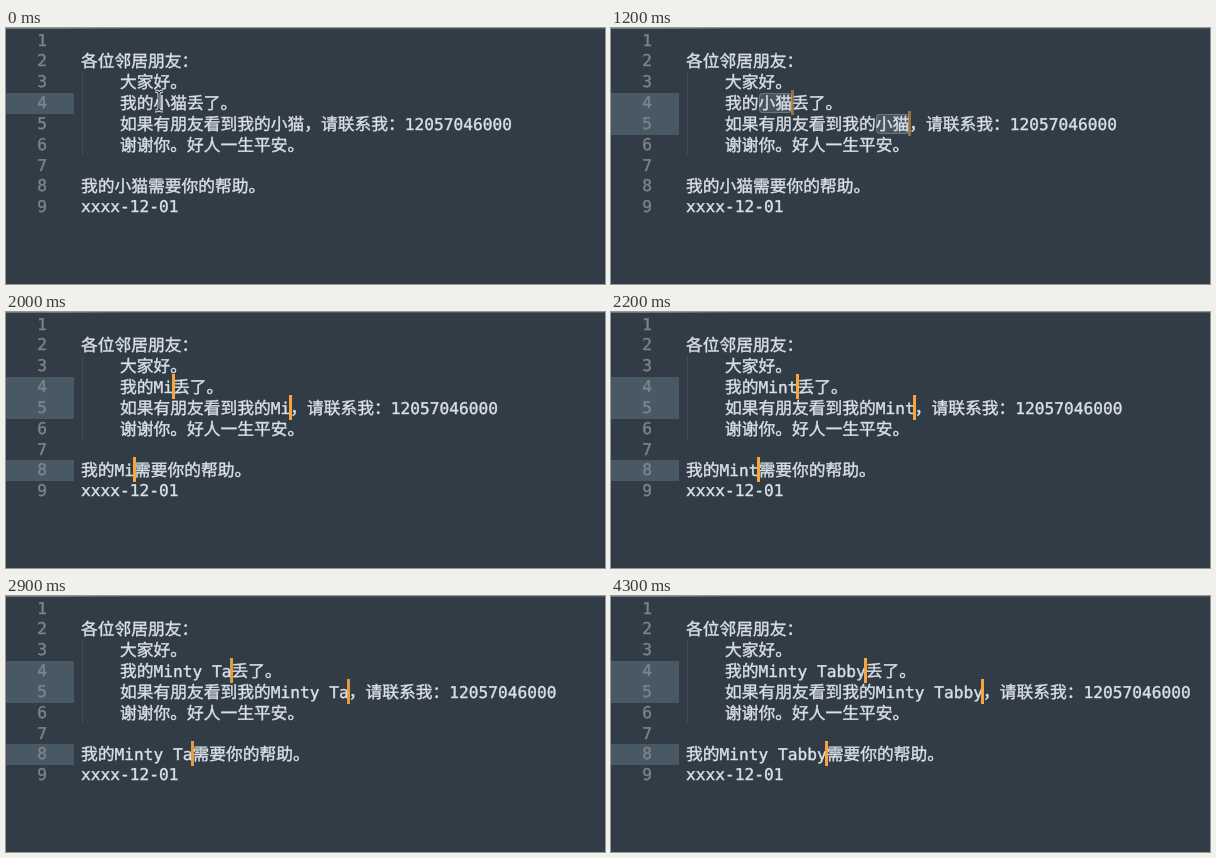
An HTML page for the animation above (4400 ms loop, 599x256 px).

```html
<!DOCTYPE html>
<html lang="zh-CN">
<meta charset="utf-8">
<style>
html, body { margin: 0; width: 100%; height: 100%; overflow: hidden; background: #313c46; }
#editor {
  position: absolute; inset: 0; padding-top: 2.5px; overflow: hidden;
  font: 16.2px/20.85px 'DejaVu Sans Mono', 'Noto Sans CJK SC', monospace;
  color: #dae0e8; white-space: pre; -webkit-text-stroke: 0.4px;
  text-rendering: geometricPrecision; text-spacing-trim: space-all;
}
#edge { position: absolute; top: 0; width: 100%; height: 1px; background: linear-gradient(90deg, #6b767e 10%, #4b5761 20%); }
.row { position: relative; height: 20.85px; }
.num { position: absolute; width: 41px; height: 20.85px; padding-right: 27px; text-align: right; color: #7a858d; }
.num.on { background: #485964; }
.text { position: absolute; left: 75px; }
.han { font-size: 16.76px; }
.sel { background: #46555e; border-radius: 4px; box-shadow: inset 0 0 0 1px #6a7980; }
.caret { position: relative; }
.caret::after { content: ''; position: absolute; left: -1.5px; top: -4px; width: 3px; height: 25px; background: #f6a63c; }
#guide { position: absolute; left: 76px; top: 44px; width: 1px; height: 83px; background: #424e57; }
#beam { position: absolute; left: 147px; top: 61px; fill: none; }
</style>
<div id="editor"><div id="edge"></div><div id="guide"></div></div>
<svg id="beam" width="12" height="24">
  <defs><path id="shape" d="M2 2q4 0 4 3v14q0 3-4 3M10 2q-4 0-4 3m0 14q0 3 4 3"/></defs>
  <use href="#shape" stroke="#dde3e8" stroke-width="3"/>
  <use href="#shape" stroke="#242b32" stroke-width="1.2"/>
</svg>
<script>
const LOOP = 4400, STEP = 100, BLINK = 1200;
const OLD = '小猫', NEW = 'Minty Tabby';
const lines = [
  '', '各位邻居朋友：', '    大家好。', '    我的@丢了。',
  '    如果有朋友看到我的@，请联系我：12057046000', '    谢谢你。好人一生平安。',
  '', '我的@需要你的帮助。', 'xxxx-12-01'
];
const picks = [500, 900, 1300];  // when each occurrence is selected
const keys = [1800, 1900, 2100, 2200, 2400, 2500, 2600, 2680, 3000, 3080, 3140];

const editor = document.getElementById('editor');
const beam = document.getElementById('beam');
const han = s => s.replace(/[\u3000-\uffff]+/g, '<span class="han">$&</span>');

editor.insertAdjacentHTML('beforeend', lines.map((line, i) =>
  `<div class="row"><div class="num">${i + 1}</div><div class="text">${
    han(line).replace('@', '<span class="word"></span><span class="caret"></span>')}</div></div>`).join(''));

const slots = [...document.querySelectorAll('.word')].map(word => ({
  word,
  caret: word.nextSibling,
  num: word.closest('.row').firstChild
}));

function draw(now) {
  const t = Math.floor(now % LOOP / STEP) * STEP;
  const typed = keys.filter(k => k <= t).length;
  const lastAction = Math.max(...[...picks, ...keys].filter(k => k <= t));
  const glow = 0.5 + Math.cos((t - lastAction) / BLINK * 2 * Math.PI);

  slots.forEach(({ word, caret, num }, i) => {
    const picked = t >= picks[i];
    word.textContent = typed ? NEW.slice(0, typed) : OLD;
    word.className = 'word' + (typed ? '' : picked ? ' han sel' : ' han');
    caret.style.opacity = picked ? Math.max(0, Math.min(1, glow)) : 0;
    num.classList.toggle('on', picked || i === 0);
  });
  beam.style.visibility = t < picks[0] ? 'visible' : 'hidden';
}

const start = performance.now();
(function tick() {
  draw(performance.now() - start);
  requestAnimationFrame(tick);
})();
</script>
</html>
```
